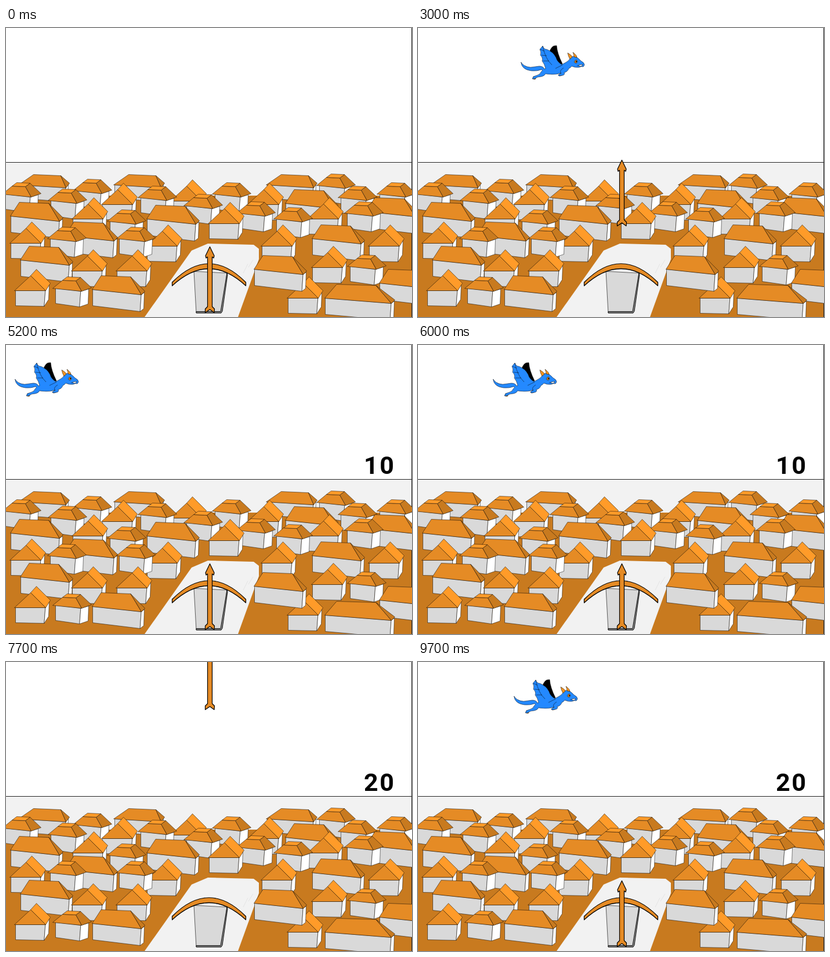
An HTML page that plays this animation: 700x500 px, repeating every 9800 ms.

```html
<!DOCTYPE html>
<html lang="en">
<head>
<meta charset="utf-8">
<title>Dragon and crossbow</title>
<style>
html, body { margin: 0; width: 100%; height: 100%; overflow: hidden; background: #fff; }
svg { display: block; width: 700px; height: 500px; }
#town { stroke: #000; stroke-width: .5; stroke-linejoin: round; }
#stand, #bow, #arrow { stroke: #000; stroke-linejoin: round; }
#bow, #arrow { fill: #e58b25; stroke-width: 1.2; }
#dragon { stroke: #000; stroke-width: .5; stroke-linejoin: round; fill: #2489ff; }
#dragon .horn { fill: #f79420; }
#dragon .line { fill: none; }
#score { font: 700 43px Roboto, "Liberation Sans", sans-serif; letter-spacing: 2.5px; }
</style>
</head>
<body>
<svg viewBox="0 0 700 500">
  <rect y="233" width="700" height="267" fill="#f2f2f2"/>
  <path d="M0 290H700V500H0Z" fill="#c87a1f"/>
  <path d="M239 500L320 385L348 373L427 375L436 382V400L400 500Z" fill="#f2f2f2"/>
  <path d="M409 424L417 408M418 414L426 401" stroke="#e4e4e4"/>
  <path d="M0 232.500H700M699.500 0V500" stroke="#222"/>
  <g id="town"></g>
  <g id="stand">
    <path d="M324 421L381 424L371 493H328Z" fill="#d9d9d9" stroke-width=".6"/>
    <path d="M381 424L382 427L373 490L371 493H328V490.500H370Z" fill="#888" stroke-width=".9"/>
  </g>
  <path id="bow" d="M286.500 440Q350 375.500 413.500 440V446Q350 387 286.500 446Z"/>
  <path id="arrow" d="M351.500 378.500L359 394L358 398L355.500 396V482L359.500 486L359 492.500L351.500 487L343.500 492.500V486L347.500 482V396L345 398L344 394Z"/>
  <g id="dragon">
    <path d="M48 20Q50 4 57 1L62 .5Q63 14 72 32L62 34Z" fill="#000"/>
    <path class="horn" d="M21 58L22 54L27 55L25 59Z M65 52L69 49L73 51L68 53Z"/>
    <path d="M.500 29Q5 37 17 38Q25 37 32 36Q39 36 41 41
      Q48 36 57 35Q70 35 77 30Q83 27 85 23Q86 19 93 19Q99 21 104 27
      Q110 30 110 34L108 37Q104 36 101 38Q94 39 88 36Q86 39 83 40
      Q81 46 75 47Q77 51 72 52L66 53L65 51L70 48Q60 51 51 50Q45 50 43 49
      Q41 53 36 54L29 55L24 58L20 58L22 54L28 52Q34 50 35 46Q39 43 36 42
      Q28 45 18 44Q2 42 .500 29Z"/>
    <path d="M43 40Q41 32 37 27Q39 22 34 17Q36 12 33 7L38 1Q40 7 45 7
      Q56 11 61 21Q63 29 72 34L60 40"/>
    <path class="line" d="M38 1Q42 23 54 34M34 7L41 10M36 17L45 18M39 27L49 27M74 39Q67 43 69 48M97 35Q103 37 107 34"/>
    <path class="horn" d="M81 13Q88 17 89 20L85 24Q82 19 81 13Z M90 12Q97 17 97 21L92 20Q92 16 90 12Z"/>
    <path class="horn" d="M93 27L96 25L98 28L96 31L93 30Z"/>
    <circle cx="96" cy="28" r="1" fill="#000"/>
    <path d="M100 34L107 33L105 36L101 36Z" fill="#fff"/>
  </g>
  <text id="score" x="617" y="223"></text>
</svg>
<script>
const FRONT = '#d9d9d9', SIDE = '#fff', ROOF = '#e58b25', LIGHT = '#ff9b29', DARK = '#c87a1f';
const $ = id => document.getElementById(id);

// Eaves run left, corner, right; ridge and back are the upper ends of the roof faces.
const long = width => ({
  left: [0, 24], corner: [width - 6, 33], right: [width, 27],
  ridge: [[width * .17, 0], [width * .73, 2]], back: [], inset: 1, wall: 29, slope: DARK
});
const kinds = {
  far: { left: [0, 18], corner: [82, 23], right: [88, 15],
    ridge: [[26, 0], [73, 2]], back: [], inset: 2, wall: 24, slope: DARK },
  long: long(91),
  barn: long(121),
  hip: { left: [0, 19], corner: [50, 24], right: [67, 18],
    ridge: [[17, 5], [40, 6]], back: [[48, 0]], inset: 5, wall: 27, slope: DARK },
  gable: { left: [0, 37], corner: [54, 37], right: [62, 24],
    ridge: [[28, 11]], back: [[38, 0]], inset: 2, wall: 27, slope: LIGHT }
};

const shift = ([x, y], dx, dy) => [x + dx, y + dy];
const face = (fill, points) => `<polygon fill="${fill}" points="${points.join(' ')}"/>`;

function house(kind, x, y) {
  const { left, corner, right, ridge, back, inset, wall, slope } = kinds[kind];
  const a = shift(left, inset, 0), b = shift(corner, -inset / 3, 0), c = shift(right, -inset, 2);
  const foot = shift(b, -2, wall), top = ridge[ridge.length - 1];
  const faces = [
    face(FRONT, [a, b, foot, shift(a, 0, wall - 1)]),
    face(SIDE, [b, c, shift(c, -1, wall - 1), foot]),
    face(ROOF, [left, ...ridge, corner]),
    face(slope, [top, ...back, right, corner])
  ];
  if (kind === 'hip') {
    const far = shift(ridge[0], back[0][0] - top[0], back[0][1] - top[1]);
    faces.push(face(LIGHT, [ridge[0], far, back[0], top]));
  }
  return `<g transform="translate(${x + .5} ${y + .5})">${faces.join('')}</g>`;
}

// Rows from back to front, with the left end of each house.
const rows = [
  { y: 253, far: [21, 448, 185], hip: [535] },
  { y: 262, gable: [283], hip: [115] },
  { y: 268, hip: [-7, 639, 355], gable: [164, 416] },
  { y: 274, hip: [227, 572] },
  { y: 279, long: [481], hip: [72] },
  { y: 288, hip: [306] },
  { y: 293, long: [620], gable: [519, 113] },
  { y: 301, long: [7], hip: [397, 583], gable: [348] },
  { y: 306, long: [242] },
  { y: 311, hip: [461] },
  { y: 315, hip: [174] },
  { y: 335, long: [101], gable: [6] },
  { y: 340, long: [527], gable: [439, 624, 241] },
  { y: 345, hip: [190, 71] },
  { y: 377, long: [24], gable: [526] },
  { y: 383, gable: [112, 189] },
  { y: 430, gable: [484] },
  { y: 393, hip: [588], long: [427] },
  { y: 417, gable: [14], long: [643] },
  { y: 428, long: [148] },
  { y: 431, hip: [80] },
  { y: 443, barn: [549] }
];
$('town').innerHTML = rows.map(({ y, ...row }) =>
  Object.entries(row).map(([kind, xs]) => xs.map(x => house(kind, x, y)).join('')).join('')
).join('');

const LOOP = 9800, START_X = -207, DRAGON_STEP = 6, ARROW_STEP = 10, FLIGHT = 50;
const shots = [{ launch: 49, hit: 81 }, { launch: 138, hit: 166 }];

// Game ticks run evenly, but slow down around the first shot.
function ticksAt(t) {
  const ramp = (t0, n0, t1, n1) => n0 + (n1 - n0) * (t - t0) / (t1 - t0);
  return Math.floor(t < 2400 ? ramp(0, -6.4, 2400, 52.1)
    : t < 3000 ? ramp(2400, 52.1, 3000, 64.1)
    : ramp(3000, 64.1, LOOP, 231.04));
}

function draw(now) {
  const time = now % LOOP;
  const hold = time >= 2400 && time < 2900 ? 300 : 100;
  const n = ticksAt(Math.floor(time / hold) * hold);
  const hits = shots.filter(s => n >= s.hit);
  const sinceReset = hits.length ? n - hits[hits.length - 1].hit : n;
  const flying = shots.find(s => n >= s.launch && n < s.launch + FLIGHT);
  const lift = flying ? ARROW_STEP * (n - flying.launch) : 0;
  $('dragon').setAttribute('transform', `translate(${START_X + DRAGON_STEP * sinceReset} 30)`);
  $('arrow').setAttribute('transform', `translate(0 ${-lift})`);
  $('score').textContent = hits.length ? hits.length * 10 : '';
}

const start = performance.now();
function tick() {
  draw(performance.now() - start);
  requestAnimationFrame(tick);
}
tick();
</script>
</body>
</html>
```
